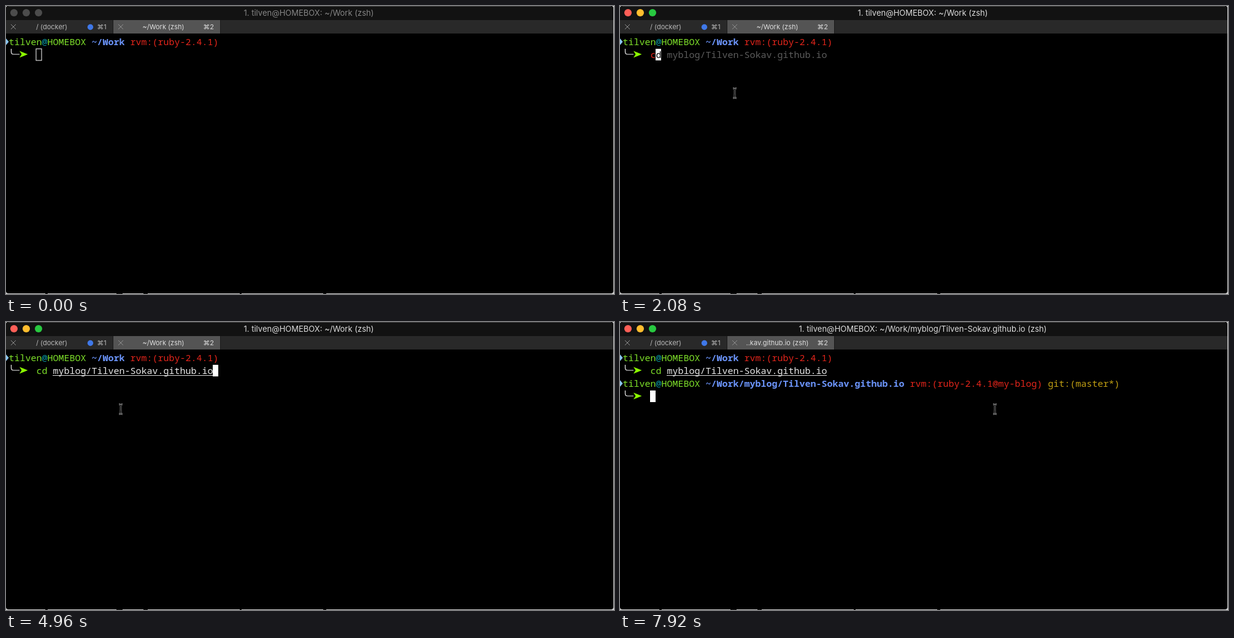
An HTML page for the animation above (8 s loop, 991 by 471 pixels).

```html
<!DOCTYPE html>
<html lang="en">
<head>
<meta charset="utf-8">
<title>Terminal</title>
<style>
  html, body { margin: 0; width: 100%; height: 100%; overflow: hidden; background: #d4d4d4; }
  svg { display: block; width: 991px; height: 471px; }
  text { white-space: pre; }
  .mono { font: 300 15px "Noto Sans Mono", "DejaVu Sans Mono", monospace; font-variant-ligatures: none; }
  .ui { font: 11px Inter, Roboto, sans-serif; fill: #dedede; text-anchor: middle; }
  .ui.dim { fill: #b8b8b8; }
  #title { font-size: 13px; fill: #dcdcdc; }
  .user { fill: #7ee02a; }
  .at { fill: #0a9aa6; }
  .path { fill: #6c95fb; font-weight: 600; }
  .rvm { fill: #e3251b; }
  .git { fill: #c2a013; }
  .hint { fill: #5c5c5c; }
  .cross { stroke: #8c8c8c; stroke-width: 1; }
  .halo { stroke: #b0b0b0; stroke-width: 2.6; }
  .core { stroke: #000; stroke-width: .9; }
  .blurred .light { fill: #4c4c4c; }
  .blurred #title { fill: #858585; }
  .blurred #block { fill: none; stroke: #fff; }
</style>
</head>
<body>
<svg id="stage" viewBox="0 0 991 471">
  <defs>
    <path id="cross" class="cross" d="M-4-4 4 4M4-4-4 4"/>
    <path id="stem" fill="none" d="M-3-8q3 0 3 2.500V5.500q0 2.500-3 2.500M3-8q-3 0-3 2.500V5.500q0 2.500 3 2.500M-1.500 3.500h3"/>
    <g id="lead">
      <path d="M0 4 4.500 9.500 0 15Z" fill="#8cc8f5"/>
      <path d="M8.500 21v5q0 4 4 4H22" fill="none" stroke="#eee" stroke-width="1.200"/>
      <path d="M22 24.500 35.500 30 22 35.500 25.500 30Z" fill="#8cff00"/>
    </g>
  </defs>

  <rect width="990" height="470" rx="4"/>
  <path d="M0 23V4q0-4 4-4h982q4 0 4 4v19Z" fill="#121212"/>
  <path d="M4 .5H986" stroke="#444"/>
  <path d="M0 23H990V45H0Z" fill="#292929"/>
  <path d="M175 23H349V45H175Z" fill="#545454"/>
  <path d="M174.500 23V45M349.500 23V45" stroke="#1b1b1b"/>
  <path d="M64 470.500h4M180 470.500h10M224 470.500h7M381 470.500h3M517 470.500h5" stroke="#222"/>

  <circle class="light" cx="13" cy="11" r="6" fill="#ff5f57"/>
  <circle class="light" cx="33" cy="11" r="6" fill="#ffbd2e"/>
  <circle class="light" cx="53" cy="11" r="6" fill="#28c940"/>
  <text id="title" class="ui" x="493.500" y="16"></text>

  <use href="#cross" x="12" y="34"/>
  <text class="ui dim" x="74.500" y="38">/ (docker)</text>
  <circle cx="137.500" cy="34.500" r="4.700" fill="#3f78e8"/>
  <text class="ui dim" x="156" y="38">⌘1</text>
  <use href="#cross" x="187" y="34"/>
  <text id="tab" class="ui" x="256.500" y="38"></text>
  <text class="ui" x="330" y="38">⌘2</text>

  <use href="#lead" y="49"/>
  <text class="mono user" x="4.500" y="64">tilven<tspan class="at">@</tspan>HOMEBOX <tspan class="path">~/Work</tspan> <tspan class="rvm">rvm:(ruby-2.4.1)</tspan></text>

  <g id="result">
    <use href="#lead" y="91"/>
    <text class="mono user" x="4.500" y="106">tilven<tspan class="at">@</tspan>HOMEBOX <tspan class="path">~/Work/myblog/Tilven-Sokav.github.io</tspan> <tspan class="rvm">rvm:(ruby-2.4.1@my-blog)</tspan> <tspan class="git">git:(master*)</tspan></text>
  </g>

  <rect id="block" width="9" height="19" fill="#fff"/>
  <text class="mono" x="49.500" y="85"><tspan id="command"></tspan><tspan id="argument" fill="#e8e8e8"></tspan><tspan id="under"></tspan><tspan id="hint" class="hint"></tspan></text>
  <rect id="underline" x="76" y="87" height="1" fill="#d8d8d8"/>

  <g id="beam">
    <use href="#stem" class="halo"/>
    <use href="#stem" class="core"/>
  </g>
  <path id="arrow" fill="#000" stroke="#fff" d="M0 0V14L3.300 11 5.500 16 7.800 15 5.600 10.200H10Z"/>
</svg>

<script>
  const LOOP = 8000, STEP = 80, CELL = 9;
  const REPO = "myblog/Tilven-Sokav.github.io";
  const HOME = "1. tilven@HOMEBOX: ~/Work";

  // start, command, argument, suggested rest
  const typing = [
    [0, "", "", ""],
    [2080, "c", "", "d " + REPO],
    [2240, "cd", "", " " + REPO],
    [2720, "cd ", "", "../.."],
    [4160, "cd ", REPO[0], REPO.slice(1)],
    [4960, "cd ", REPO, ""]
  ];
  // start, window title, tab title
  const titles = [
    [0, HOME + " (zsh)", "~/Work (zsh)"],
    [5840, `1. cd ${REPO} (zsh)`, "cd (zsh)"],
    [6000, `${HOME}/${REPO} (zsh)`.replace("~/Work/", "~/Work/"), "..kav.github.io (zsh)"]
  ].map(([start, title, tab]) => [start, title, tab]);

  const el = id => document.getElementById(id);
  const current = (list, t) => list.filter(item => item[0] <= t).pop();
  const show = (id, on) => el(id).style.display = on ? "" : "none";
  const place = (id, x, y) => el(id).setAttribute("transform", `translate(${x} ${y})`);
  const write = (id, text) => { if (el(id).textContent !== text) el(id).textContent = text; };

  // Eased progress over five picture steps, the last one arriving.
  function glide(t, start) {
    const p = Math.min(1, Math.max(0, (Math.floor((t - start) / STEP) + 1) / 5));
    return p * p * (3 - 2 * p);
  }

  function pointer(t) {
    if (t < 320) return [494.5, 408];
    if (t < 560) return [243, 36];
    const down = glide(t, 560), across = glide(t, 7600);
    return [243 - 56 * down + 424 * across, 36 + 106.5 * down];
  }

  function draw(t) {
    el("stage").classList.toggle("blurred", t < 560);

    const [, title, tab] = current(titles, t);
    write("title", title);
    write("tab", tab);

    const [, command, argument, rest] = current(typing, t);
    write("command", command);
    write("argument", argument);
    write("under", rest.slice(0, 1));
    write("hint", rest.slice(1));
    el("command").setAttribute("class", command === "c" ? "rvm" : "user");
    el("underline").setAttribute("width", CELL * argument.length);

    const column = 5 + command.length + argument.length;
    if (t < 5840) place("block", 4 + CELL * column, 70);
    else if (t < 6080) place("block", 4, 91);
    else place("block", 49, 112);
    show("result", t >= 6080);

    const [x, y] = pointer(t);
    const overTabs = y < 45;
    show("beam", t >= 240 && !overTabs);
    show("arrow", t >= 240 && overTabs);
    place("beam", x, y);
    place("arrow", x, y);
  }

  function frame() {
    draw(performance.now() % LOOP);
    requestAnimationFrame(frame);
  }
  frame();
</script>
</body>
</html>
```
